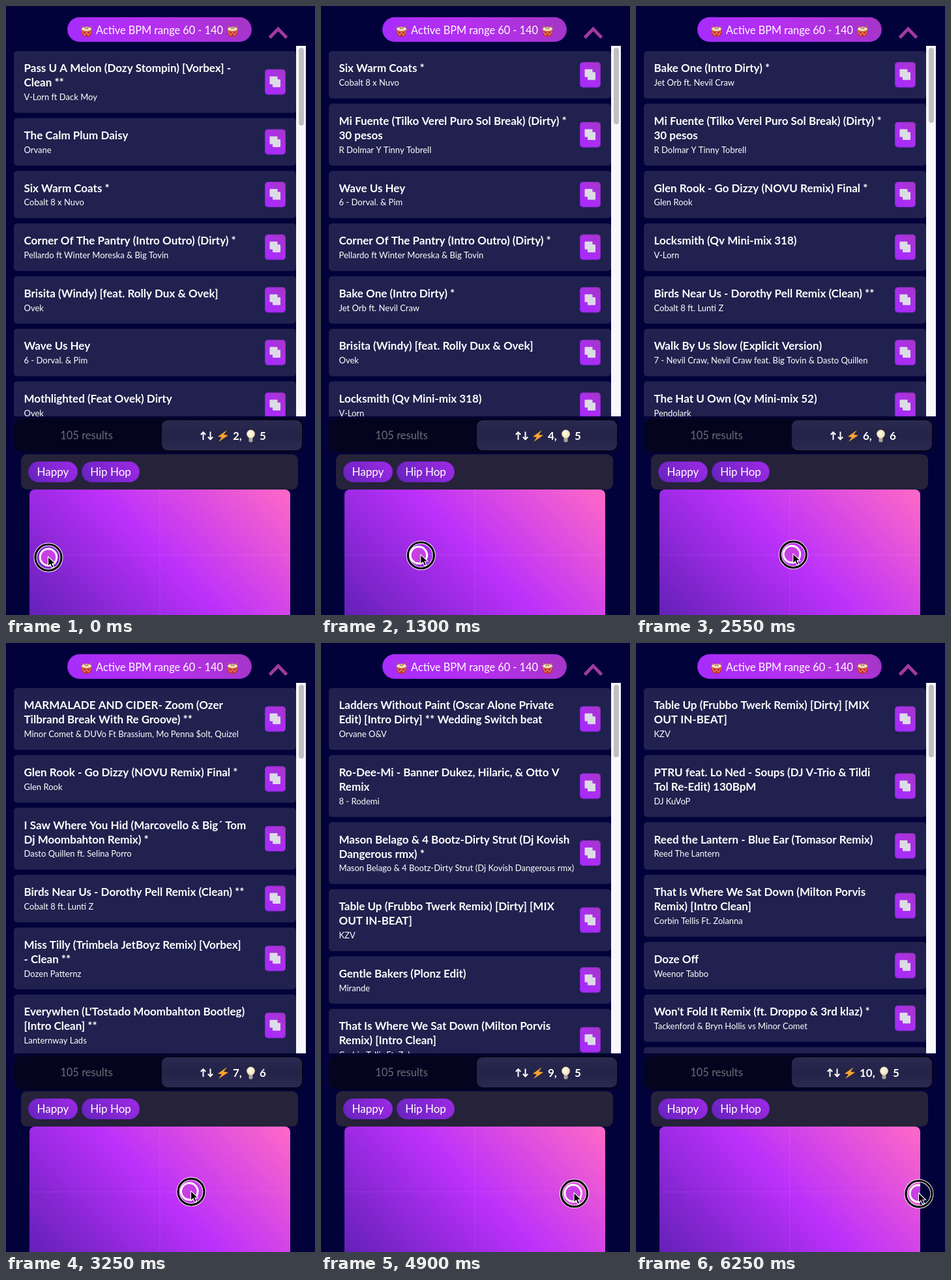
An HTML page with a canvas for the animation above (6.3 s loop, 474 by 932 pixels).

```html
<!DOCTYPE html>
<html lang="en">
<head>
<meta charset="utf-8">
<title>Track finder</title>
<style>
  html, body { margin: 0; width: 100%; height: 100%; overflow: hidden; background: #02023b; }
  canvas { display: block; width: 474px; height: 932px; }
</style>
</head>
<body>
<canvas id="stage"></canvas>
<script>
const W = 474, H = 932, LOOP = 6300, STEP = 50, LAG = 40;
const canvas = document.getElementById('stage');
const ctx = canvas.getContext('2d');
const ratio = window.devicePixelRatio || 1;
canvas.width = W * ratio;
canvas.height = H * ratio;
ctx.scale(ratio, ratio);

const FACE = 'Lato, "Open Sans", sans-serif';
const PAD = { x: 36, y: 740, w: 400, h: 200 };

// Each track: title lines, then the artist.
const tracks = {
  A: ['Pass U A Melon (Dozy Stompin) [Vorbex] -', 'Clean **', 'V-Lorn ft Dack Moy'],
  B: ['The Calm Plum Daisy', 'Orvane'],
  C: ['Six Warm Coats *', 'Cobalt 8 x Nuvo'],
  D: ['Corner Of The Pantry (Intro Outro) (Dirty) *', 'Pellardo ft Winter Moreska & Big Tovin'],
  E: ['Brisita (Windy) [feat. Rolly Dux & Ovek]', 'Ovek'],
  F: ['Wave Us Hey', '6 - Dorval. & Pim'],
  G: ['Mothlighted (Feat Ovek) Dirty', 'Ovek'],
  H: ['Mi Fuente (Tilko Verel Puro Sol Break) (Dirty) *', '30 pesos', 'R Dolmar Y Tinny Tobrell'],
  I: ['Bake One (Intro Dirty) *', 'Jet Orb ft. Nevil Craw'],
  J: ['Walk By Us Slow (Explicit Version)', '7 - Nevil Craw, Nevil Craw feat. Big Tovin & Dasto Quillen'],
  K: ['Locksmith (Qv Mini-mix 318)', 'V-Lorn'],
  L: ['The Hat U Own (Qv Mini-mix 52)', 'Pendolark'],
  M: ['Plumcrate', 'Sovia'],
  N: ['MARMALADE AND CIDER- Zoom (Ozer', 'Tilbrand Break With Re Groove) **', 'Minor Comet & DUVo Ft Brassium, Mo Penna $olt, Quizel'],
  O: ['Glen Rook - Go Dizzy (NOVU Remix) Final *', 'Glen Rook'],
  P: ['I Saw Where You Hid (Marcovello & Big´ Tom', 'Dj Moombahton Remix) *', 'Dasto Quillen ft. Selina Porro'],
  Q: ['Birds Near Us - Dorothy Pell Remix (Clean) **', 'Cobalt 8 ft. Lunti Z'],
  R: ['Miss Tilly (Trimbela JetBoyz Remix) [Vorbex]', '- Clean **', 'Dozen Patternz'],
  S: ["Everywhen (L'Tostado Moombahton Bootleg)", '[Intro Clean] **', 'Lanternway Lads'],
  T: ['Ladders Without Paint (Oscar Alone Private', 'Edit) [Intro Dirty] ** Wedding Switch beat', 'Orvane O&V'],
  U: ['Mason Belago & 4 Bootz-Dirty Strut (Dj Kovish', 'Dangerous rmx) *', 'Mason Belago & 4 Bootz-Dirty Strut (Dj Kovish Dangerous rmx)'],
  V: ['Ro-Dee-Mi - Banner Dukez, Hilaric, & Otto V', 'Remix', '8 - Rodemi'],
  W: ['NUNU - Banner Dukez vs Tapstep Party Break', '(Dirty)', '6 - Picnic Tonic'],
  X: ['Gentle Bakers (Plonz Edit)', 'Mirande'],
  Y: ['Farewell To The Garden (BPM Walnut Party', 'Starter) (Dirty)', '7 - Fendo, Danish Dakora & Big Valve ft Olivka Tern'],
  Z: ['Table Up (Frubbo Twerk Remix) [Dirty] [MIX', 'OUT IN-BEAT]', 'KZV'],
  a: ['PTRU feat. Lo Ned - Soups (DJ V-Trio & Tildi', 'Tol Re-Edit) 130BpM', 'DJ KuVoP'],
  b: ['That Is Where We Sat Down (Milton Porvis', 'Remix) [Intro Clean]', 'Corbin Tellis Ft. Zolanna'],
  c: ['Doze Off', 'Weenor Tabbo'],
  d: ['Reed the Lantern - Blue Ear (Tomasor Remix)', 'Reed The Lantern'],
  e: ["Won't Fold It Remix (ft. Droppo & 3rd klaz) *", 'Tackenford & Bryn Hollis vs Minor Comet']
};

// Start time, list order, lower end of the scroll thumb.
const orders = [
  [0, 'ABCDEFG', 183], [720, 'ABCDEFH', 183], [1250, 'CHFDIEK', 181],
  [1770, 'CHIJKLM', 180], [2480, 'IHOKQJL', 179], [3190, 'NOPQRS', 177],
  [3850, 'TOUVQS', 176], [4100, 'TUVWXY', 175], [4540, 'TVUZXb', 175],
  [5000, 'ZabcdT', 175], [5550, 'ZacbdeT', 175], [6000, 'ZadbceT', 175]
];

// Pointer path: time, x, y.
const path = [
  [0, 65, 844], [700, 102, 842.6], [850, 114, 842], [1800, 194, 839.8],
  [3250, 284, 839.8], [4250, 356, 841], [5500, 413, 844], [6250, 434, 843]
];

function slope(i, k) {
  const a = path[Math.max(i - 1, 0)], b = path[Math.min(i + 1, path.length - 1)];
  return (b[k] - a[k]) / (b[0] - a[0]);
}

function pointer(t) {
  t = Math.min(Math.max(t, 0), path[path.length - 1][0]);
  let i = 0;
  while (i < path.length - 2 && t >= path[i + 1][0]) i++;
  const p = path[i], q = path[i + 1], span = q[0] - p[0], u = (t - p[0]) / span;
  const at = k => p[k] * (1 + 2 * u) * (1 - u) ** 2 + q[k] * u * u * (3 - 2 * u)
    + span * (slope(i, k) * u * (1 - u) ** 2 + slope(i + 1, k) * u * u * (u - 1));
  return { x: at(1), y: at(2) };
}

function box(x, y, w, h, r, fill) {
  ctx.beginPath();
  ctx.roundRect(x, y, w, h, r);
  ctx.fillStyle = fill;
  ctx.fill();
}

function text(str, x, y, size, weight = 400, color = '#fff', align = 'left') {
  ctx.font = `${weight} ${size}px ${FACE}`;
  ctx.textAlign = align;
  ctx.fillStyle = color;
  ctx.fillText(str, x, y);
}

function poly(points, fill) {
  ctx.beginPath();
  points.forEach(([x, y]) => ctx.lineTo(x, y));
  ctx.closePath();
  ctx.fillStyle = fill;
  ctx.fill();
}

function lines(points, color, width) {
  ctx.beginPath();
  points.forEach(([x, y], i) => i ? ctx.lineTo(x, y) : ctx.moveTo(x, y));
  ctx.strokeStyle = color;
  ctx.lineWidth = width;
  ctx.stroke();
}

function oval(x, y, rx, ry, fill) {
  ctx.beginPath();
  ctx.ellipse(x, y, rx, ry, 0, 0, 7);
  ctx.fillStyle = fill;
  ctx.fill();
}

function ring(x, y, r, color, width) {
  ctx.beginPath();
  ctx.arc(x, y, r, 0, 7);
  ctx.strokeStyle = color;
  ctx.lineWidth = width;
  ctx.stroke();
}

// Gradient at 45 degrees from bottom left to top right of a box.
function slant(x, y, w, h, ...colors) {
  const d = (w + h) / 4, cx = x + w / 2, cy = y + h / 2;
  const g = ctx.createLinearGradient(cx - d, cy + d, cx + d, cy - d);
  colors.forEach((c, i) => g.addColorStop(i / (colors.length - 1), c));
  return g;
}

function slantBox(x, y, w, h, r, ...colors) {
  box(x, y, w, h, r, slant(x, y, w, h, ...colors));
}

// Slanted fill with a faint darker rim.
function button(x, y, w, h, r, ...colors) {
  slantBox(x, y, w, h, r, ...colors);
  ctx.beginPath();
  ctx.roundRect(x + 0.5, y + 0.5, w - 1, h - 1, r);
  ctx.strokeStyle = 'rgba(70,25,150,.3)';
  ctx.lineWidth = 1;
  ctx.stroke();
}

function drum(x, y) {
  box(x - 7.5, y - 3, 15, 12, [2, 2, 6, 6], '#c42f3c');
  lines([[x - 6.5, y + 1], [x - 3, y + 7], [x, y + 2], [x + 3, y + 7], [x + 6.5, y + 1]], '#e8b75f', 1);
  oval(x, y - 2.5, 8, 3.8, '#d9a24e');
  oval(x, y - 3, 6.8, 2.8, '#f1ebe4');
  lines([[x - 8, y - 7.5], [x + 3, y - 2.5]], '#b9783f', 1.3);
  lines([[x + 8, y - 7.5], [x - 3, y - 2.5]], '#b9783f', 1.3);
}

function header() {
  button(94, 17, 283, 38, 19, '#a52cff', '#b52fee', '#a436c4');
  drum(123.5, 38);
  drum(347.5, 38);
  text('Active BPM range 60 - 140', 235.5, 43, 16.3, 400, '#fff', 'center');
  lines([[404.5, 48.5], [417.5, 35], [430.5, 48.5]], '#a03a9e', 5);
}

function card(track, y) {
  const titles = track.slice(0, -1), h = 50.6 + 22 * titles.length;
  box(12, y, 433, h, 5, '#20214e');
  titles.forEach((line, i) => text(line, 27.5, y + 32.4 + 22 * i, 17, 700));
  text(track[track.length - 1], 27.5, y + 31.2 + 22 * titles.length, 13);
  const mid = y + h / 2;
  button(397, mid - 19.5, 32, 39, 5, '#a42aff', '#ac2fee', '#a437c2');
  box(404.5, mid - 8.5, 12, 12, 1, '#dcdce6');
  box(409, mid - 4, 12, 12, 1, '#dcdce6');
  return h + 8;
}

function list(t) {
  const [, order, end] = orders.filter(o => o[0] <= t).pop();
  ctx.save();
  ctx.beginPath();
  ctx.rect(0, 61, W, 567);
  ctx.clip();
  let y = 69;
  for (const key of order) y += card(tracks[key], y);
  ctx.restore();
  box(445, 61, 15, 567, 0, '#f8f8fc');
  box(449, 64, 8, end - 64, 4, '#c0c0c2');
}

function counter(p) {
  const energy = Math.round(1 + 9 * (p.x - PAD.x) / PAD.w);
  const mood = Math.round(1 + 9 * (PAD.y + PAD.h - p.y) / PAD.h);
  const wide = energy > 9 ? 10 : 0, x = 298 - wide / 2;
  lines([[x + 4.5, 664], [x + 4.5, 652.5]], '#fff', 2);
  lines([[x + 0.8, 656], [x + 4.5, 652.2], [x + 8.2, 656]], '#fff', 2);
  lines([[x + 15.5, 651.5], [x + 15.5, 663]], '#fff', 2);
  lines([[x + 11.8, 659.5], [x + 15.5, 663.3], [x + 19.2, 659.5]], '#fff', 2);
  poly([[x + 41, 649], [x + 27, 659], [x + 33, 660], [x + 28, 667], [x + 43, 657], [x + 36, 656]], '#fba52c');
  text(energy + ',', x + 50, 664, 17, 700);
  const bx = x + 77.5 + wide;
  box(bx - 3, 660, 6, 7.5, 2, '#a9a39a');
  oval(bx, 655, 6.3, 6.5, '#f5e6c0');
  oval(bx - 1, 654, 3.5, 4, '#fff6de');
  text(mood, x + 91 + wide, 664, 17, 700);
}

function bars(p) {
  ctx.save();
  ctx.shadowColor = '#04041f';
  ctx.shadowBlur = 5 * ratio;
  box(13, 631, 443, 52, 14, '#04041f');
  ctx.restore();
  text('105 results', 123.5, 662.5, 16.5, 400, '#6c6c78', 'center');
  const shade = ctx.createLinearGradient(0, 634, 0, 680);
  ['#2a2a50', '#232349', '#2a2a50'].forEach((c, i) => shade.addColorStop(i / 2, c));
  box(239, 634, 215, 46, 9, shade);
  counter(p);
  box(23, 686, 425, 54, 9, '#252239');
  [['Happy', 34, 76], ['Hip Hop', 116, 89]].forEach(([name, x, w]) => {
    button(x, 697, w, 32, 16, '#6423bd', '#a02ae6');
    text(name, x + w / 2, 718.5, 17, 400, '#fff', 'center');
  });
}

function pad(knob) {
  const { x, y, w, h } = PAD;
  slantBox(x, y, w, h, 8, '#6120b6', '#bb30fb', '#ff69c6');
  ctx.setLineDash([2, 1]);
  lines([[x + w / 2, y], [x + w / 2, H]], 'rgba(255,255,255,.13)', 1);
  lines([[x, y + h / 2], [x + w, y + h / 2]], 'rgba(255,255,255,.13)', 1);
  ctx.setLineDash([]);
  ctx.save();
  ctx.beginPath();
  ctx.roundRect(x, y, w, h, 8);
  ctx.clip();
  oval(knob.x, knob.y - 0.5, 12, 12, '#c840e4');
  ring(knob.x, knob.y - 0.5, 12.8, '#fff', 3);
  ctx.restore();
}

function arrow(x, y) {
  const shape = [[0, 0], [0, 15], [3.5, 11.8], [6, 17.5], [8.8, 16.3], [6.3, 10.8], [11, 10.6]]
    .map(([dx, dy]) => [x + dx, y + dy]);
  poly(shape, '#000');
  lines([...shape, shape[0]], '#fff', 1.1);
}

function draw(t) {
  const p = pointer(t);
  ctx.fillStyle = '#02023b';
  ctx.fillRect(0, 0, W, H);
  header();
  list(t);
  bars(p);
  pad(pointer(t - LAG));
  ring(p.x, p.y, 20, '#fff', 5);
  ring(p.x, p.y, 20, '#000', 3.2);
  arrow(p.x - 0.5, p.y - 1.5);
}

const start = performance.now();
let last = -1;
function tick(now) {
  const t = Math.floor((Math.max(now - start, 0) % LOOP) / STEP) * STEP;
  if (t !== last) draw(last = t);
  requestAnimationFrame(tick);
}
tick(start);
</script>
</body>
</html>
```
